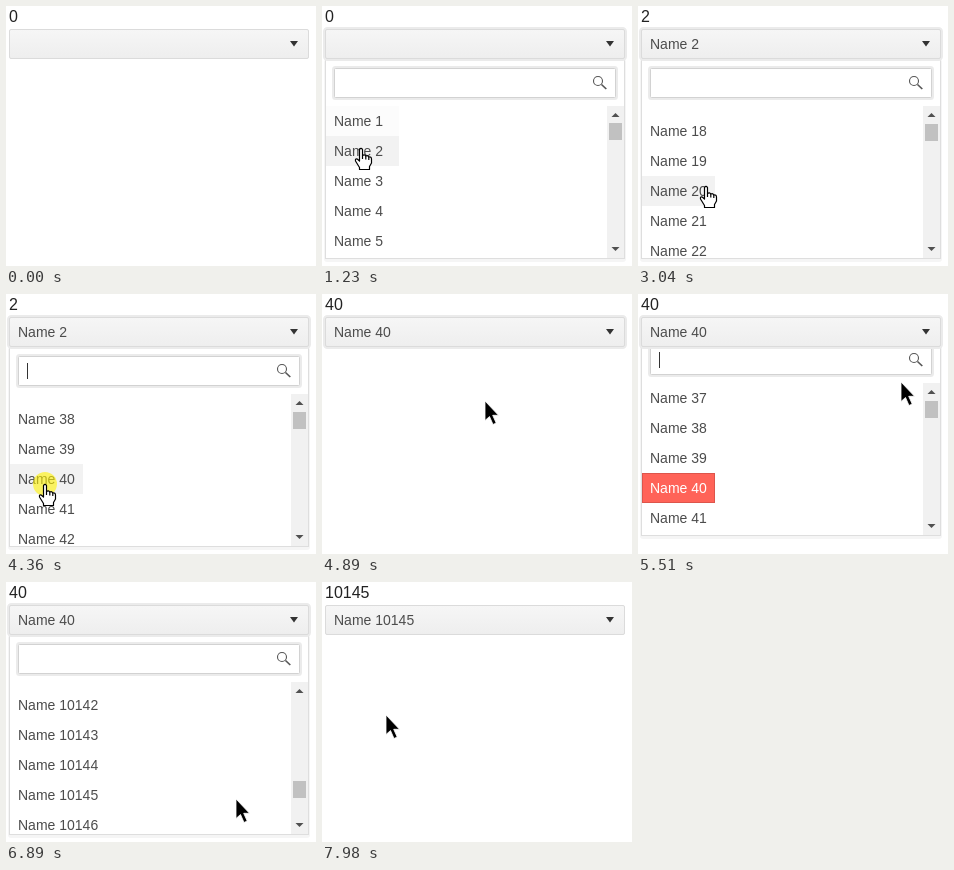
Animation of 310x260 px, one loop 8000 ms. Source, as an HTML page:

```html
<!DOCTYPE html>
<html lang="en">
<head>
<meta charset="utf-8">
<title>Dropdown list</title>
<style>
  html, body { margin: 0; width: 100%; height: 100%; overflow: hidden; background: #fff; }
  svg { display: block; width: 310px; height: 260px; }
  text { font: 14px "Liberation Sans", Arial, sans-serif; fill: #4c4c4c; white-space: pre; }
  #total { font-size: 16px; fill: #222; }
</style>
</head>
<body>
<svg viewBox="0 0 310 260" width="310" height="260">
  <defs>
    <linearGradient id="face" x2="0" y2="1">
      <stop stop-color="#f6f6f6"/><stop offset="1" stop-color="#eee"/>
    </linearGradient>
    <clipPath id="below"><rect y="53" width="310" height="207"/></clipPath>
    <clipPath id="listArea"><rect x="4" y="100" width="281" height="152"/></clipPath>
  </defs>

  <text id="total" x="3" y="16"></text>

  <g clip-path="url(#below)">
    <g id="popup">
      <rect x="2" y="53" width="302" height="203" rx="3" fill="#000" opacity=".04"/>
      <rect x="3.5" y="52.5" width="299" height="200" fill="#fff" stroke="#dedede"/>
      <rect x="11.5" y="61.5" width="283" height="31" rx="2" fill="none" stroke="#ebebeb" stroke-width="3"/>
      <rect x="12.5" y="62.5" width="281" height="29" rx="1" fill="#fff" stroke="#d2d2d2"/>
      <circle cx="276" cy="75" r="4.5" fill="none" stroke="#555" stroke-width="1.1"/>
      <path d="M279.5 78.5L284.3 83" stroke="#555" stroke-width="1.7"/>
      <path id="caret" d="M21.5 69V85" stroke="#333"/>
      <g id="rows" clip-path="url(#listArea)"></g>
      <rect x="285" y="100" width="17" height="152" fill="#f1f1f1"/>
      <path d="M289.5 111H297.5L293.5 107ZM289.5 241H297.5L293.5 245Z" fill="#505050"/>
      <rect id="thumb" x="287" width="13" height="17" fill="#c1c1c1"/>
    </g>
  </g>

  <rect id="glow" x="2.5" y="22.5" width="301" height="31" rx="3" fill="none" stroke="#ebebeb" stroke-width="3"/>
  <rect x="3.5" y="23.5" width="299" height="29" rx="1.5" fill="url(#face)" stroke="#dbdbdb"/>
  <text id="value" x="12" y="43"></text>
  <path d="M284 35H292L288 40.5Z" fill="#333"/>

  <g id="pointer">
    <circle id="press" r="12" fill="#fff200" opacity=".6"/>
    <path id="arrow" d="M0 0V19.5L4.5 15.5L8 23.5L11.2 22L7.7 14.3H13.5Z" fill="#000" stroke="#fff" stroke-width=".8"/>
    <g id="hand" stroke="#000" stroke-width="1.2" stroke-linejoin="round">
      <path d="M-1.5 1.5Q0 -.8 1.5 1.5V7.5Q3.5 6 4.8 8Q6.8 7 7.8 9Q10.5 8.3 10.5 11V15L8.5 18.5V21.5H-1.5V19.5L-5.5 13Q-6 10.5 -3.8 11L-1.5 13Z" fill="#fff"/>
      <path d="M1.5 7.5V11M4.8 8V11.5M7.8 9V12" fill="none"/>
    </g>
  </g>
</svg>
<script>
const LOOP = 8000, ENTER = 70, ROW = 30, LIST_TOP = 100, LIST_END = 252;
const OPEN_MS = 300, CLOSE_MS = 180, PRESS_MS = 150, BLINK = 530, FRAME = 77;
const $ = id => document.getElementById(id);

const visits = [
  { open: 545, close: 1460, pick: 2 },
  { open: 2244, close: 4440, pick: 40 },
  { open: 5280, close: 7660, pick: 10145 }
];
const wheel = { start: 2890, nudge: 3590, end: 3760 };
const drag = { start: 6200, end: 6600, scroll: 304222 };

// Arrival time and place; the pointer leaves once its pending action is over.
const stops = [
  [ENTER, 268, 15], [850, 272, 36], [1230, 39, 142],
  [visits[1].open, 279, 44], [2330, 279, 86], [2720, 68, 180], [4130, 39, 190],
  [visits[2].open, 262, 40], [5510, 263, 88], [5880, 295, 127],
  [drag.end, 296, 218], [7430, 62, 213], [7980, 64, 133]
];
const actions = [...visits.map(v => v.close), wheel.end, drag.start];

const clamp = (v, top = 1) => Math.min(top, Math.max(0, v));
const smooth = p => p * p * (3 - 2 * p);
const easeOut = p => 1 - (1 - p) ** 2;
const lerp = (a, b, p) => a + (b - a) * p;
const during = (t, from, length) => t >= from && t < from + length;
const show = (id, on) => $(id).setAttribute("visibility", on ? "visible" : "hidden");

function pointerAt(t) {
  const next = stops.findIndex(stop => stop[0] > t);
  if (next < 1) return stops.at(next).slice(1);
  const [from, x0, y0] = stops[next - 1], [arrive, x1, y1] = stops[next];
  const leave = Math.max(from, ...actions.filter(a => a < arrive));
  const p = smooth(clamp((t - leave) / (arrive - leave)));
  return [lerp(x0, x1, p), lerp(y0, y1, p)].map(Math.round);
}

function scrollAt(t, visit, picked) {
  const ticks = (from, count) => clamp(Math.floor((t - from) / FRAME) + 1, count);
  const start = Math.max(0, (picked - 4) * ROW);
  if (visit === visits[1]) return 250 * ticks(wheel.start, 4) + 50 * ticks(wheel.nudge, 2);
  return Math.round(lerp(start, drag.scroll, smooth(clamp((t - drag.start) / (drag.end - drag.start)))));
}

function opennessAt(t, visit) {
  if (!visit) return 0;
  return easeOut(clamp((t - visit.open) / OPEN_MS)) * (1 - easeOut(clamp((t - visit.close) / CLOSE_MS)));
}

function isPressed(t) {
  return during(t, drag.start, drag.end - drag.start) || visits.some(v =>
    during(t, v.open - PRESS_MS / 2, PRESS_MS) || during(t, v.close - PRESS_MS, PRESS_MS));
}

function rowMarkup(n, y, width, fill, stroke, color) {
  return `<rect x="4.5" y="${y + .5}" width="${width - 1}" height="29" fill="${fill}" stroke="${stroke}"/>` +
    `<text x="12" y="${y + 20}" style="fill:${color}">Name ${n}</text>`;
}

function listMarkup(scroll, picked, x, y) {
  const first = Math.floor(scroll / ROW) + 1;
  const width = 57 + 8 * Math.max(2, String(first).length);
  let markup = "", hovering = false;
  for (let n = first; n < first + 7; n++) {
    const top = LIST_TOP + (n - 1) * ROW - scroll;
    const hover = x >= 4 && x < 4 + width && y >= Math.max(top, LIST_TOP) && y < Math.min(top + ROW, LIST_END);
    hovering ||= hover;
    const fill = hover ? "#f2f2f2" : !picked && n === 1 ? "#fcfcfc" : "#fff";
    markup += n === picked
      ? rowMarkup(n, top, width, "#ff6358", "#dd554b", "#fff")
      : rowMarkup(n, top, width, fill, fill, "#4c4c4c");
  }
  return { markup, hovering };
}

function draw(t) {
  const visit = visits.findLast(v => v.open <= t);
  const picked = visits.findLast(v => v.close <= t)?.pick ?? 0;
  const openness = opennessAt(t, visit);
  const offset = Math.round(-200 * (1 - openness));
  const scroll = scrollAt(t, visit, picked);
  const [x, y] = pointerAt(t);

  $("total").textContent = picked;
  $("value").textContent = picked ? "Name " + picked : "";
  show("glow", t >= visits[0].open - PRESS_MS / 2 && t < visits[2].close + CLOSE_MS);

  show("popup", openness > 0);
  $("popup").setAttribute("transform", `translate(0 ${offset})`);
  const list = listMarkup(scroll, picked, x, y - offset);
  $("rows").innerHTML = list.markup;
  $("thumb").setAttribute("y", Math.round(lerp(117.4, 199, scroll / drag.scroll)));
  $("caret").setAttribute("opacity", visit && Math.floor((t - visit.open + 30) / BLINK) % 2 === 0 ? 1 : 0);

  const hand = openness > 0 && list.hovering;
  $("pointer").setAttribute("transform", `translate(${x} ${y})`);
  $("pointer").setAttribute("display", t >= ENTER ? "inline" : "none");
  show("hand", hand);
  show("arrow", !hand);
  show("press", isPressed(t));
}

const start = performance.now();
function tick() {
  draw((performance.now() - start) % LOOP);
  requestAnimationFrame(tick);
}
tick();
</script>
</body>
</html>
```
